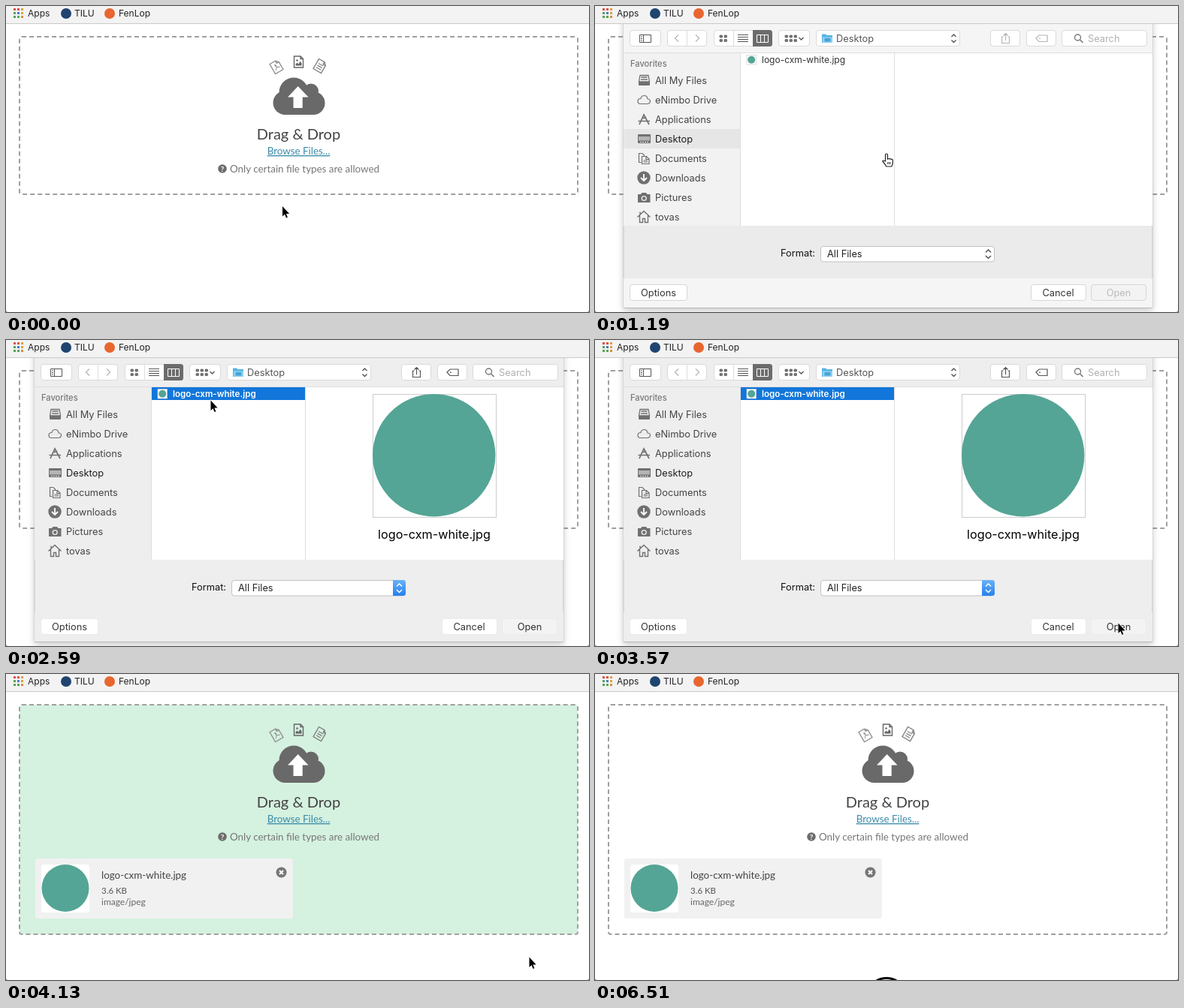
An HTML page that plays this animation: 776 px wide and 408 px high, repeating every 6.58 s.

```html
<!DOCTYPE html>
<html lang="en">
<head>
<meta charset="utf-8">
<title>File upload</title>
<style>
html, body { margin: 0; width: 100%; height: 100%; overflow: hidden; background: #fff; }
svg { display: block; width: 776px; height: 408px; }
.ui { font-family: Inter, Roboto, sans-serif; }
.page { font-family: Lato, "Open Sans", sans-serif; }
.dashed { box-sizing: border-box; height: 100%; border: 2px dashed #a0a0a0; border-radius: 4px; }
</style>
</head>
<body>
<svg id="stage" viewBox="0 0 776 408" xmlns="http://www.w3.org/2000/svg"></svg>
<script>
const LOOP = 6580, TEAL = '#54a595';
const stage = document.getElementById('stage');

const text = (x, y, s, size, fill = '#444', more = '') =>
  `<text x="${x}" y="${y}" font-size="${size}" fill="${fill}" ${more}>${s}</text>`;
const rect = (x, y, w, h, fill, more = '') =>
  `<rect x="${x}" y="${y}" width="${w}" height="${h}" fill="${fill}" ${more}/>`;
const circle = (x, y, r, fill, more = '') =>
  `<circle cx="${x}" cy="${y}" r="${r}" fill="${fill}" ${more}/>`;
const line = (d, stroke = '#666', w = 1, more = '') =>
  `<path d="${d}" fill="none" stroke="${stroke}" stroke-width="${w}" ${more}/>`;
const shape = (d, fill, more = '') => `<path d="${d}" fill="${fill}" ${more}/>`;
const group = (id, body, more = '') => `<g id="${id}" ${more}>${body}</g>`;
const button = (x, w, id = '', y = 32, fill = '#fff') =>
  rect(x + .5, y + .5, w - 1, 21, fill, `rx="3.5" stroke="#dadada" ${id && `id="${id}"`}`);

function bookmarks() {
  const dots = ['#d9534a', '#d9534a', '#e0a13c', '#57a55a', '#4a7fc1', '#e0a13c', '#57a55a', '#57a55a', '#d98f3c'];
  return rect(0, 0, 776, 24, '#f3f3f3') + rect(0, 23, 776, 1, '#cacaca') +
    dots.map((c, i) => rect(10 + i % 3 * 5, 3 + (i / 3 | 0) * 5, 3, 3, c)).join('') +
    circle(80, 10, 7, '#1f4470') + circle(138, 10, 7, '#e8662f') +
    text(29, 14, 'Apps', 12, '#222') + text(91, 14, 'TILU', 12, '#222') + text(150, 14, 'FenLop', 12, '#222');
}

function doc(x, y, turn, color, inner) {
  const page = line('M-6-7.5H2.5L6-4V7.5H-6ZM2.5-7.5V-4H6', color, 1.4);
  return `<g transform="translate(${x} ${y}) rotate(${turn})">${page}${inner}</g>`;
}

function cloud() {
  const c = '#696969';
  return circle(371.5, 129, 16, c) + circle(383, 115, 19.5, c) + circle(406, 113.5, 10, c) +
    circle(409, 129.5, 15.5, c) + rect(371.5, 115, 38, 30, c) +
    shape('M388.7 107L402.5 121.5H394.7V136H382.5V121.5H375Z', '#fff');
}

function dropzone() {
  return rect(18, 41, 743, 210, '#d5f1e0', 'rx="4" id="tint"') +
    '<foreignObject id="zone" x="17" y="40" width="745" height="212"><div class="dashed"></div></foreignObject>' +
    doc(360, 81, -30, '#909090', line('M-3 4Q1 0 0-3Q-1-4-1-2Q0 2 4 2', '#909090')) +
    doc(389.5, 74.5, 0, '#666', shape('M-4 5V3L-2 1L0 3L2-1L4 2V5Z', '#666') + circle(-2, -2, 1.3, '#666')) +
    doc(418, 80, 30, '#808080', line('M-3.5-2H3.5M-3.5 1H3.5M-3.5 4H3.5', '#808080', 1.2)) +
    cloud() +
    text(389.5, 178, 'Drag &amp; Drop', 20, '#444', 'text-anchor="middle"') +
    text(389.5, 198, 'Browse Files...', 13.4, '#3a8ba8', 'text-anchor="middle" text-decoration="underline" id="link"') +
    circle(288, 217, 5.8, '#6c6c6c') +
    text(288, 221, '?', 10, '#fff', 'text-anchor="middle" font-weight="700"') +
    text(298, 222, 'Only certain file types are allowed', 13.4, '#777');
}

function card() {
  return rect(39, 246, 343, 80, '#f1f1f1', 'rx="3"') + rect(47, 254, 64, 64, '#fff', 'rx="3"') +
    circle(79, 285.5, 31.5, TEAL) +
    text(127, 273, 'logo-cxm-white.jpg', 13.4) + text(127, 293, '3.6 KB', 11.5, '#555') +
    text(127, 308, 'image/jpeg', 12, '#666') +
    circle(366.5, 264.5, 7, '#777') + line('M364 262l5 5m0-5l-5 5', '#fff', 2);
}

function toolbar() {
  const g = '#555';
  const grid = (x, n) => Array.from({ length: n * 2 }, (_, i) =>
    rect(x + i % n * 6, 39 + (i / n | 0) * 5.5, 3.5, 3, '#777', `rx=".6" stroke="${g}" stroke-width=".7"`)).join('');
  return button(46, 42) + line('M59.5 38.5H74.5V48.5H59.5ZM64.5 38.5V48.5M61 41H63M61 43.5H63M61 46H63', g) +
    button(96, 53) + line('M122.5 32V54', '#ddd') +
    line('M111 38.5L106.5 43L111 47.5M134 38.5L138.5 43L134 47.5', '#b8b8b8', 1.4) +
    button(158, 78) + line('M184.5 32V54', '#ddd') +
    shape('M210 32H232.5Q236 32 236 35.5V50.5Q236 54 232.5 54H210Z', '#6c6c6c') +
    grid(166, 2) + line('M190 38.5H204M190 41.5H204M190 44.5H204M190 47.5H204', g) +
    line('M215.5 38.5H230.5V48.5H215.5ZM220.5 38.5V48.5M225.5 38.5V48.5', '#fff') +
    button(244, 42) + grid(253, 3) + line('M271.5 42L274.5 45L277.5 42', g, 1.4) +
    button(294, 192) + shape('M302 37.5H307L308.5 39H316V49H302Z', '#55b5e4') +
    rect(303, 41.5, 13, 7.5, '#8fd2f2') + rect(305.5, 43, 8, 4.5, '#4aa3d6') +
    text(321, 47.5, 'Desktop', 12.8, '#555') + line('M474.5 41L477.5 38L480.5 41M474.5 45.5L477.5 48.5L480.5 45.5', g, 1.4) +
    button(526, 40) + button(574, 40) +
    group('tools', line('M543.5 41H541.5V49.5H551.5V41H549.5M546.5 46V36.5M543.5 39.5L546.5 36.5L549.5 39.5', 'currentColor', 1.2) +
      line('M587 43L591 39H602V47.5H591Z', 'currentColor', 1.2) + circle(592, 43.2, .9, 'currentColor')) +
    button(621, 114) + circle(642.5, 42, 4, 'none', 'stroke="#777" stroke-width="1.4"') + line('M645.5 45L649.5 49', '#777', 1.6) +
    text(656, 47.5, 'Search', 12.8, '#b0b0b0');
}

function sidebar() {
  const c = '#707070';
  const icons = [
    line('M60 92.5H71L72.5 101H58.5ZM61.5 95H69.5M61 98H70', c, 1.3) + rect(58, 101, 15, 5, c, 'rx="1"'),
    line('M60.5 130.5H70Q73.5 130 73.5 127T70 124Q69.5 119.5 65.5 119.5T61 123.5Q57 123.5 57 127T60.5 130.5Z', c, 1.2),
    line('M59 158L65 145L72 158M57.5 153.5H73M64 150L68 148', c, 1.7),
    rect(57, 171, 17, 12, c, 'rx="1"') + rect(58, 174, 15, 5.5, '#b5b5b5') + line('M60 181.5H71', '#eee', 1, 'stroke-dasharray="2 1"'),
    line('M61.5 208.5H58.5V196.5H63L65.5 199V200M62.5 200.5H68.5L72 204V210.5H62.5ZM68 201V204.5H72M64.5 206H70M64.5 208H70', c, 1.2),
    circle(65, 229, 8.7, c) + line('M65 224V232M61 229L65 233L69 229', '#fff', 1.8),
    shape('M57 251H61L62.5 249H68L69.5 251H73.5V262H57Z', c) + circle(65.2, 256.5, 3.6, '#eee') + circle(65.2, 256.5, 2.2, c),
    line('M56.5 281.5L65 273.5L73.5 281.5M59.5 279.5V288.5H63.5V283.5H66.5V288.5H70.5V279.5M60 277.5V274.5', c, 1.4)
  ];
  const names = ['All My Files', 'eNimbo Drive', 'Applications', 'Desktop', 'Documents', 'Downloads', 'Pictures', 'tovas'];
  return rect(38, 164, 155, 26, '#e6e6e6', 'id="place"') + text(47, 81, 'Favorites', 11.1, '#777', 'font-weight="500"') +
    names.map((n, i) => icons[i] + text(80, 104 + i * 26, n, 12.8, n === 'Desktop' ? '#1c1c1c' : '#444')).join('');
}

function sheet() {
  return rect(38, 12, 704, 390.5, '#ebebeb', 'id="body" stroke="#b5b5b5" stroke-width=".8" filter="url(#shadow)"') +
    rect(38, 12, 704, 50, '#f5f5f5', 'class="bar"') + rect(38, 363, 704, 39, '#f5f5f5', 'class="bar"') +
    rect(38, 62, 155, 231, '#f2f2f2', 'id="side"') + rect(194, 62, 548, 231, '#fff') +
    line('M38 62.5H742M193.5 62V293M398.5 62V293', '#dedede') +
    group('content', toolbar() + sidebar() +
      rect(194, 63, 204, 17, '#1276da', 'id="row"') +
      rect(202, 65.5, 12.5, 12.5, '#fff', 'stroke="#ccc" stroke-width=".7"') + circle(208.2, 71.7, 5, TEAL) +
      text(222, 76, 'logo-cxm-white.jpg', 12, '#333', 'id="file"')) +
    group('preview', rect(488.5, 72.5, 164, 164, '#fff', 'stroke="#ccc"') + circle(569.7, 153.7, 81.7, TEAL) +
      text(570, 265, 'logo-cxm-white.jpg', 16.2, '#000', 'text-anchor="middle"')) +
    text(247, 334, 'Format:', 12.8, '#111') +
    rect(300.5, 320.5, 231, 20.5, '#fff', 'rx="3.5" stroke="#c2c2c2"') + text(309, 335, 'All Files', 12.8, '#222') +
    shape('M515 320H528.5Q532 320 532 323.5V337.5Q532 341 528.5 341H515Z', 'url(#blue)', 'id="stepper"') +
    line('M520 328.5L523.5 325L527 328.5M520 333L523.5 336.5L527 333', '#fff', 1.5, 'id="arrows"') +
    button(46, 77, 'b0', 371) + button(580, 74, 'b1', 371) + button(660, 74, 'b2', 371) +
    ['Options', 'Cancel', 'Open'].map((s, i) =>
      text([84.5, 616.5, 697][i], 387, s, 12.8, '#444', `text-anchor="middle" id="l${i}"`)).join('');
}

stage.innerHTML = `<defs><clipPath id="under">${rect(0, 24, 776, 384, '#000')}</clipPath>
  <linearGradient id="blue" x2="0" y2="1"><stop stop-color="#6ab3f7"/><stop offset="1" stop-color="#2580ee"/></linearGradient>
  <filter id="shadow" x="-5%" y="-5%" width="110%" height="112%">
  <feDropShadow dx="0" dy="3" stdDeviation="4" flood-color="#000" flood-opacity=".22"/></filter></defs>` +
  rect(0, 0, 776, 408, '#fff') +
  group('page', dropzone() + group('card', card()), 'class="page"') +
  `<g clip-path="url(#under)" class="ui">${group('sheet', sheet())}</g>` +
  group('marks', bookmarks(), 'class="ui"') +
  circle(388, 432, 26.5, '#fff', 'id="ring" stroke="#000" stroke-width="3"') +
  shape('M0 405V408H3Q0 408 0 405M776 405V408H773Q776 408 776 405', '#888') +
  group('cursor',
    '<path id="arrow" d="M.5 .5V14L3.5 11.2L5.5 16L7.4 15.2L5.4 10.5H9.6Z" stroke="#fff" stroke-width="1.2" paint-order="stroke"/>' +
    '<path id="hand" d="M-1.5 10V1.5a1.5 1.5 0 0 1 3 0V7q1-1 2.4 0q1.2-.8 2.4 .4q2-.4 2 1.4V12q0 2-1.5 5h-7q-1.5-3-5-7q.6-2 3.7 0zM2 11v3M4.5 11v3" fill="#fff" stroke="#222" stroke-width="1.2"/>');

const el = {};
stage.querySelectorAll('[id]').forEach(n => el[n.id] = n);
const bars = stage.querySelectorAll('.bar');

const ramp = (t, from, to) => Math.min(1, Math.max(0, (t - from) / (to - from)));
const ease = (t, from, to) => { const p = ramp(t, from, to); return p * p * (3 - 2 * p); };
const show = (node, on) => node.setAttribute('visibility', on ? 'inherit' : 'hidden');
const set = (node, attrs) => { for (const k in attrs) node.setAttribute(k, attrs[k]); };

// Each move: start, end, target x, target y
const moves = [[100, 630, 388, 197], [1430, 1820, 272, 80], [2800, 3430, 696, 377],
  [4950, 5500, 410, 272], [5790, 6430, 380, 275]];

function pointer(t) {
  let x = 367.5, y = 266.5;
  for (const [from, to, tx, ty] of moves) {
    const p = ease(t, from, to);
    x += (tx - x) * p;
    y += (ty - y) * p;
  }
  return [x, y];
}

function draw(t) {
  const dy = -380 * (1 - ease(t, 850, 1165) + ease(t, 3640, 3918));
  const ready = t >= 1165, active = t >= 1470, picked = t >= 2240, closing = t >= 3640;
  const flat = picked && !closing, added = t >= 3990;

  show(el.sheet, t > 850 && t < 3918);
  el.sheet.setAttribute('transform', `translate(0 ${dy.toFixed(2)})`);
  show(el.content, ready);
  show(el.preview, t >= 2380);
  show(el.row, picked);
  show(el.place, !picked);
  set(el.file, { fill: picked ? '#fff' : '#333', 'font-weight': picked ? 600 : 400, 'font-size': picked ? 11.6 : 12 });
  set(el.tools, { color: picked ? '#555' : '#b5b5b5' });
  set(el.body, { fill: flat ? '#eee' : '#ebebeb' });
  bars.forEach(b => set(b, { fill: flat ? '#eee' : ready ? '#f5f5f5' : '#efefef' }));
  set(el.side, { fill: flat ? '#eee' : ready ? '#f2f2f2' : '#e9e9e9' });
  show(el.stepper, active);
  set(el.arrows, { stroke: active ? '#fff' : '#555' });
  for (let i = 0; i < 3; i++) {
    const off = i === 2 && !picked;
    set(el['b' + i], {
      stroke: flat ? '#ebebeb' : '#d6d6d6',
      fill: i === 2 && closing ? '#e2e2e2' : !ready ? '#f1f1f1' : i === 2 ? '#f3f3f3' : '#fff'
    });
    set(el['l' + i], { fill: !ready || off ? '#bababa' : closing && i < 2 ? '#777' : '#333' });
  }

  const h = added ? 306 : 210;
  set(el.zone, { height: h + 2 });
  set(el.tint, { height: h, opacity: ramp(t, 3980, 4060) * (1 - ramp(t, 4290, 4700)) });
  show(el.card, added);

  const [x, y] = pointer(t), link = t > 560 && t < 1450;
  set(el.cursor, { transform: `translate(${x.toFixed(2)} ${y.toFixed(2)})` });
  show(el.cursor, t < 6500);
  show(el.hand, link);
  show(el.arrow, !link);
  set(el.link, { fill: link ? '#2c6579' : '#3a8ba8' });
  show(el.ring, t >= 6500);
}

const start = performance.now();
function tick() {
  draw((performance.now() - start) % LOOP);
  requestAnimationFrame(tick);
}
draw(0);
requestAnimationFrame(tick);
</script>
</body>
</html>
```
